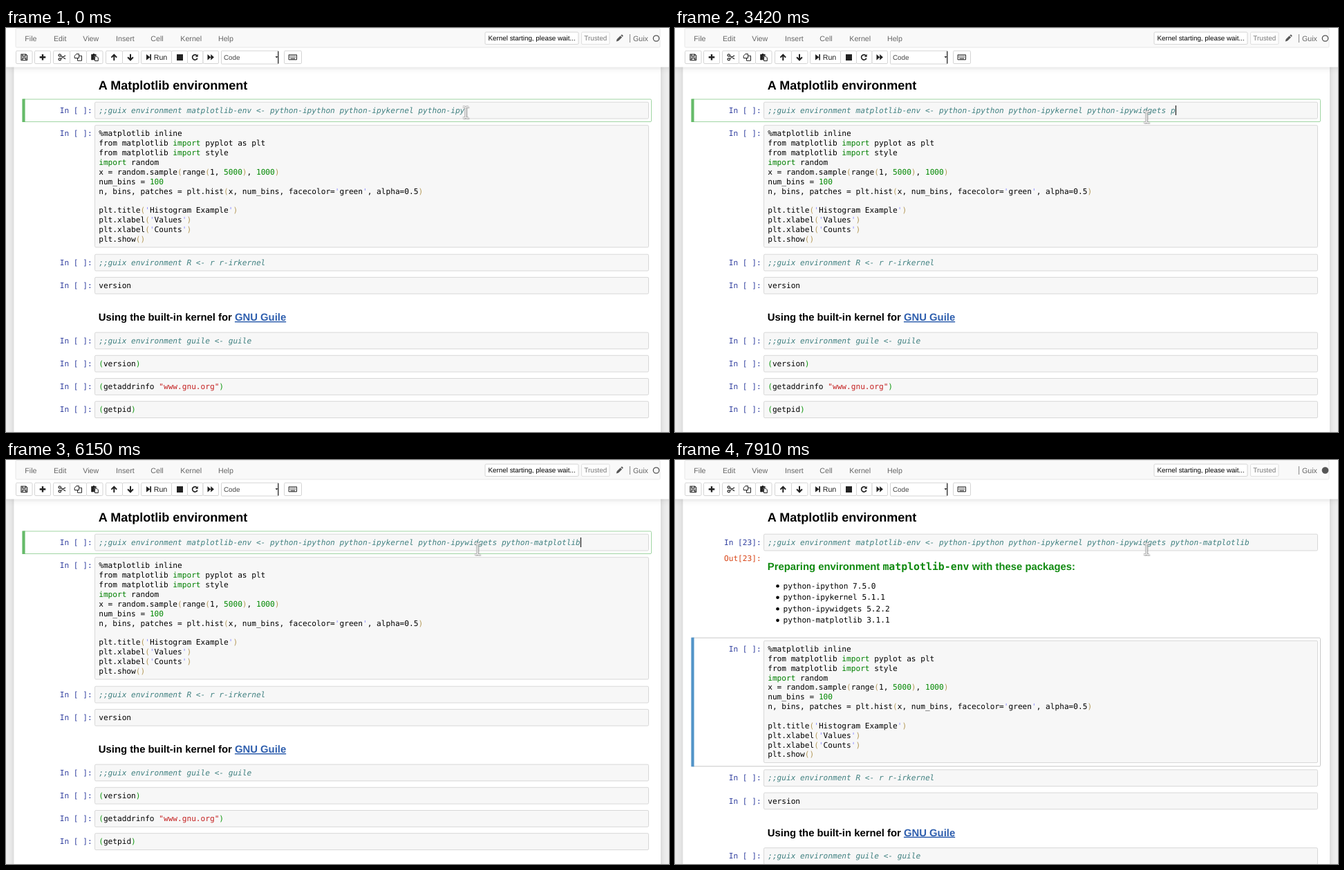
Recreate the animation shown at these times as an HTML page. Size 959 by 584 pixels, loop 8000 ms.

```html
<!DOCTYPE html>
<html lang="en">
<head>
<meta charset="utf-8">
<title>Notebook</title>
<style>
html, body { margin: 0; width: 100%; height: 100%; overflow: hidden; background: #eee; }
svg { display: block; width: 100vw; height: 100vh; }
text { white-space: pre; text-rendering: geometricPrecision; font-family: "Liberation Sans", Arial, sans-serif; }
.mono { font: 11.14px "DejaVu Sans Mono", monospace; }
.menu { font-size: 10.66px; fill: #666; }
.small { font-size: 9.84px; }
.prompt { fill: #303f9f; text-anchor: end; }
.out { fill: #d84315; }
.comment { fill: #408080; font-style: italic; }
.h2 { font-size: 18.03px; font-weight: bold; }
.h3 { font-size: 14.85px; font-weight: bold; }
.h3 .code { font-family: "DejaVu Sans Mono", monospace; }
.kw { fill: #008000; }
.num { fill: #008800; }
.br { fill: #b59a5a; }
.quote { fill: #8888ff; }
.paren { fill: #119911; }
.str { fill: #c41f1f; }
.link { fill: #2f5fae; text-decoration: underline; }
.box { fill: #f7f7f7; stroke: #d8d8d8; }
.btn { fill: #fff; stroke: #d4d4d4; }
.ln { fill: none; stroke: #222; }
.ink { fill: #222; }
.hint { font-size: 11.92px; }
</style>
</head>
<body>
<svg id="stage" viewBox="0 0 959 584" preserveAspectRatio="none">
  <defs>
    <filter id="soft" x="-10%" y="-30%" width="120%" height="160%">
      <feDropShadow dx="1.6" dy="2.5" stdDeviation="2" flood-opacity=".3"/>
    </filter>
    <filter id="glow" x="-5%" y="-30%" width="110%" height="160%">
      <feDropShadow dx="0" dy="0" stdDeviation="4" flood-color="#575757" flood-opacity=".26"/>
    </filter>
    <path id="beam" d="M-4-8H-1.5L0-7 1.5-8H4M0-7V7M-4 8H-1.5L0 7 1.5 8H4" fill="none"/>
  </defs>
  <rect width="959" height="584" fill="#eee"/>
  <rect x="11.5" y="40" width="935.5" height="600" fill="#fff" filter="url(#glow)"/>
  <g id="page"></g>
  <rect x="-20" y="-20" width="999" height="76.5" fill="#fff" filter="url(#glow)"/>
  <g id="header"></g>
  <g id="popup" filter="url(#soft)"></g>
  <g id="mouse">
    <use href="#beam" x="1.6" y="1" stroke="#777" stroke-opacity=".35" stroke-width="2.6"/>
    <use href="#beam" stroke="#a2a2a2" stroke-width="3"/>
    <use href="#beam" stroke="#f2f2f2" stroke-width="1.4"/>
  </g>
</svg>
<script>
const $ = id => document.getElementById(id);
const CHAR = 6.705, LINE = 13.86, SHIFT = 120.6, LOOP = 8000;
const LEFT = 134.2;

const esc = s => s.replace(/&/g, '&amp;').replace(/</g, '&lt;');
const span = (cls, s) => `<tspan class="${cls}">${s}</tspan>`;
const text = (x, y, cls, s, id = '') => `<text x="${x}" y="${y}" class="${cls}" id="${id}">${s}</text>`;
const rect = (x, y, w, h, cls, r = 1.6) =>
  `<rect x="${x}" y="${y}" width="${w}" height="${h}" rx="${r}" class="${cls}"/>`;
const path = (d, cls, w = 1) => `<path d="${d}" class="${cls}" stroke-width="${w}"/>`;

// A code cell whose first line is centred on y
function cell(y, lines, cls = '', id = '') {
  const h = 23.8 + (lines.length - 1) * LINE;
  return rect(128.5, y - 11.8, 801, h, 'box') +
    text(124.6, y + 3.9, 'mono prompt', 'In [ ]:', id && id + 'Prompt') +
    lines.map((s, i) => text(LEFT, y + 3.9 + i * LINE, 'mono ' + cls, s, id && id + 'Text')).join('');
}

function frame(id, y, h, line, bar) {
  return `<g id="${id}"><rect x="24.5" y="${y}" width="909" height="${h}" rx="1.5" fill="#fff" stroke="${line}"/>` +
    `<rect x="23.4" y="${y - .5}" width="4.2" height="${h + 1}" fill="${bar}"/></g>`;
}

const kinds = ['kw', 'br', 'quote', 'num'];
const paint = s => esc(s).replace(/(\bimport\b)|([()])|(')|(\b\d{3,}\b)/g,
  (m, ...g) => span(kinds[g.findIndex((v, i) => i < 4 && v)], m));

const script = `%matplotlib inline
from matplotlib import pyplot as plt
from matplotlib import style
import random
x = random.sample(range(1, 5000), 1000)
num_bins = 100
n, bins, patches = plt.hist(x, num_bins, facecolor='green', alpha=0.5)

plt.title('Histogram Example')
plt.xlabel('Values')
plt.xlabel('Counts')
plt.show()`.split('\n').map(paint);

const call = s => span('paren', '(') + s + span('paren', ')');
const packages = ['python-ipython 7.5.0', 'python-ipykernel 5.1.1', 'python-ipywidgets 5.2.2', 'python-matplotlib 3.1.1'];

$('page').innerHTML =
  text(LEFT - .4, 89, 'h2', 'A Matplotlib environment') +
  frame('editing', 103, 32.5, '#a0d5a3', '#66bb6a') +
  cell(119, [''], 'comment', 'main') +
  '<rect id="caret" y="112" width="1" height="14"/>' +
  '<g id="output">' +
    text(124.6, 146.3, 'mono prompt out', 'Out[23]:') +
    `<g fill="#108a10">${text(LEFT - .4, 159.3, 'h3', 'Preparing environment ' + span('code', 'matplotlib-env') + ' with these packages:')}</g>` +
    packages.map((s, i) => {
      const y = 182 + i * 16.55;
      return `<circle cx="148.5" cy="${y + .2}" r="2.3"/>` + text(156.6, y + 3.8, 'mono', s);
    }).join('') +
  '</g><g id="below">' +
    frame('selected', 136.5, 185.7, '#c8c8c8', '#5294c8') +
    cell(152.5, script) +
    cell(339, [esc(';;guix environment R <- r r-irkernel')], 'comment') +
    cell(372.2, ['version']) +
    text(LEFT - .4, 423, 'h3', 'Using the built-in kernel for ' + span('link', 'GNU Guile')) +
    cell(451.9, [esc(';;guix environment guile <- guile')], 'comment') +
    cell(485.1, [call('version')]) +
    cell(518.3, [call('getaddrinfo ' + span('str', '"www.gnu.org"'))]) +
    cell(551.5, [call('getpid')]) +
  '</g>';

const menu = { File: 27.3, Edit: 69, View: 111.3, Insert: 159, Cell: 209.3, Kernel: 252.3, Help: 307 };
const buttons = [[14.5, 23.5], [41.5, 23], [68.5, 24], [92.5, 24], [116.5, 23.5], [144.5, 24], [168.5, 23.5],
  [195.5, 44], [239.5, 23], [262.5, 22.5], [285, 22.5], [402.5, 25]];
const keys = [0, 1, 2, 3, 4].map(i => `M${410.3 + i * 1.9} 40.6h1M${410.3 + i * 1.9} 42.4h1`).join('');

$('header').innerHTML =
  '<rect x="14" y=".5" width="932" height="27.5" rx="1.6" fill="#f9f9f9" stroke="#e7e7e7"/>' +
  Object.entries(menu).map(([s, x]) => text(x, 18.8, 'menu', s)).join('') +
  rect(693, 6, 135, 17.6, 'btn') + text(697.5, 18.3, 'small', 'Kernel starting, please wait...') +
  `<g opacity=".7">${rect(832.5, 6, 40.5, 17.6, 'btn')}</g>` +
  `<g fill="#777">${text(836.3, 18.3, 'small', 'Trusted')}</g>` +
  '<path id="pencil" d="M882.8 19.4l.8-3.2 5-5 2.4 2.4-5 5zM889.3 10.5l.9-.8q.6-.4 1.2.1l1 1q.5.6 0 1.2l-.8.8z" fill="#555"/>' +
  '<path d="M902.5 9V21" stroke="#888"/>' + text(907, 18.8, 'menu', 'Guix') +
  '<circle id="busy" cx="940.5" cy="15" r="4.2" stroke="#555" stroke-width="1.3"/>' +
  buttons.map(([x, w]) => rect(x, 33, w, 18.5, 'btn')).join('') +
  // save, add, cut, copy, paste
  path('M22 38h6.8l1.7 1.7v6.8H22zM24 38v2.8h4V38M24 46.5v-3.2h4.6v3.2', 'ln', 1.2) +
  path('M53 38v8.6M48.7 42.3h8.6', 'ln', 2.4) +
  path('M79.5 40.5l6.5 4.3M79.5 44l6.5-4.3M76 39.4a1.8 1.5 0 1 0 3.6 0a1.8 1.5 0 1 0-3.6 0M76 45.2a1.8 1.5 0 1 0 3.6 0a1.8 1.5 0 1 0-3.6 0', 'ln', 1.2) +
  path('M102 37.5h3.5v6h-6.3v-3.3zM105.5 40.2h4v7h-6v-3.5', 'ln', 1) +
  path('M123.2 38h2l1-1h1.4l1 1h2v2.6h-2.8v5.6h-4.6z', 'ink', 0) +
  path('M128.5 41.2h3l1.8 1.8v4.5h-4.8z', 'ln', 1) +
  // move up, move down
  path('M156.3 47v-8M152.4 42.6l3.9-4 3.9 4', 'ln', 2) +
  path('M180 37.8v8M176.1 42.2l3.9 4 3.9-4', 'ln', 2) +
  // run, stop, restart, run all
  path('M203 38l5.5 4.3-5.5 4.3zM208.3 38h1.7v8.6h-1.7z', 'ink', 0) +
  text(213.7, 46, 'menu', span('ink', 'Run')) +
  path('M247 38h9v9h-9z', 'ink', 0) +
  path('M276.2 40a3.7 3.7 0 1 0 .6 3.6', 'ln', 1.7) + path('M277.7 37.7v4h-4z', 'ink', 0) +
  path('M291.5 38l4.7 4.3-4.7 4.3zM296.2 38l4.7 4.3-4.7 4.3z', 'ink', 0) +
  // cell type list
  rect(311.5, 33, 82.5, 19, 'btn', 1) + `<g fill="#444">${text(315, 46.2, 'small', 'Code')}</g>` +
  path('M393.7 33.5v18', 'ln', 1.2) + path('M389.6 41h3.6l-1.8 2.6z', 'ink', 0) +
  path('M409 38.8h11.5v7H409z', 'ln', 1) + path(keys + 'M411.5 44.2h6.5', 'ln', 1);

$('popup').innerHTML =
  '<rect x="712" y="126.8" width="229" height="42" rx="1.5" fill="#fff" stroke="#c0c0c0" stroke-width=".8"/>' +
  '<rect x="713" y="128" width="227" height="12.8" fill="#1a8cf0"/>' +
  ['', '-venn', '-documentation'].map((s, i) =>
    `<g fill="${i ? '#000' : '#fff'}">${text(714.3, 138.2 + i * LINE, 'mono hint', 'python-matplotlib' + s)}</g>`).join('');

const base = ';;guix environment matplotlib-env <- python-ipython python-ipykernel python-ipy';
const rest = 'widgets python-matplotlib';
// [time, characters of rest]
const typed = [[2040, 1], [2400, 7], [3170, 8], [3420, 9], [3550, 10], [3750, 11], [3860, 12], [3960, 13],
  [4070, 14], [4280, 15], [4460, 16], [4530, 17], [4610, 18], [6150, 25]];
const caretOn = [[490, 1010], [1520, 2890], [3170, 5120], [5630, 6710]];

const within = (t, a, b) => t >= a && t < b;
const show = (id, on) => $(id).setAttribute('visibility', on ? 'visible' : 'hidden');

function draw(t) {
  const count = typed.reduce((n, [at, len]) => t >= at ? len : n, 0);
  const line = base + rest.slice(0, count);
  const ran = t >= 6710, printed = t >= 7860;

  $('mainText').textContent = line;
  $('mainPrompt').textContent = t >= 7910 ? 'In [23]:' : ran ? 'In [*]:' : 'In [ ]:';
  $('caret').setAttribute('x', Math.floor(LEFT + line.length * CHAR));
  show('caret', caretOn.some(([a, b]) => within(t, a, b)));
  show('popup', within(t, 4990, 6150));
  show('editing', !ran);
  show('selected', ran);
  show('pencil', t < 6755);
  show('output', printed);
  $('busy').setAttribute('fill', t >= 6800 ? '#555' : 'none');
  $('below').setAttribute('transform', `translate(0 ${printed ? SHIFT : 0})`);

  const step = Math.min(10, Math.max(0, Math.floor((t - 1010) / 40) + 1));
  const ease = 1 - (1 - step / 10) ** 1.5;
  $('mouse').setAttribute('transform', `translate(${664.8 + 17 * ease} ${122 + 6.8 * ease})`);
}

const start = performance.now();
function tick() {
  draw((performance.now() - start) % LOOP);
  requestAnimationFrame(tick);
}
tick();
</script>
</body>
</html>
```
